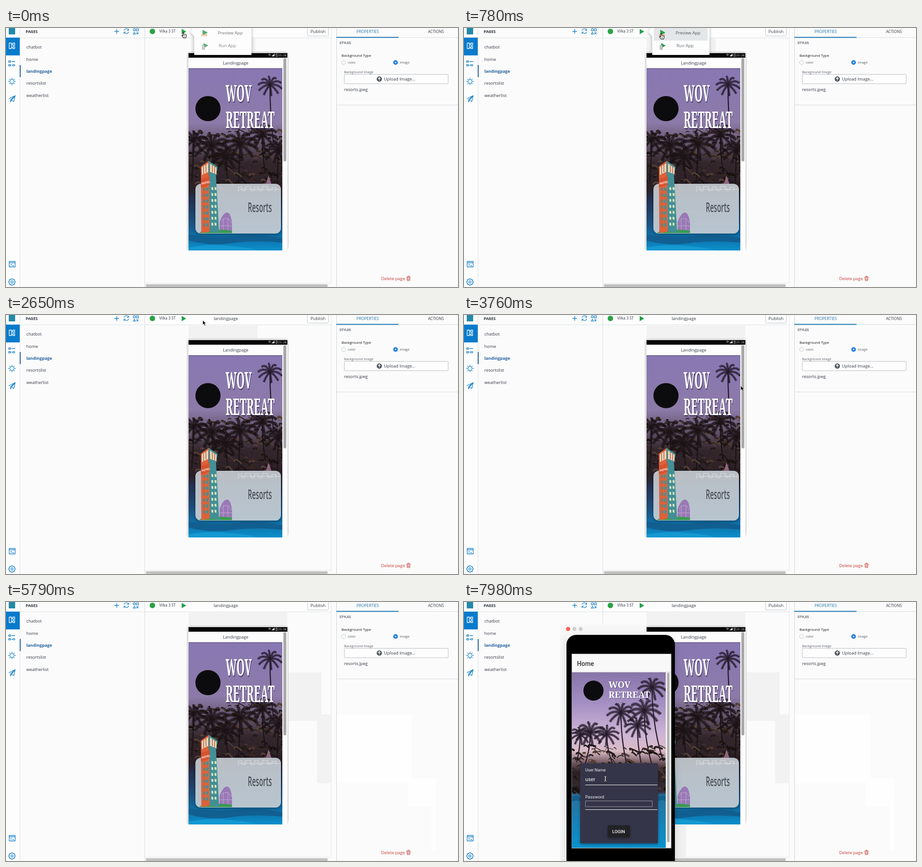
An HTML page for the animation above (8000 ms loop, 988 by 567 pixels).

```html
<!DOCTYPE html>
<html lang="en">
<head>
<meta charset="utf-8">
<title>App builder preview</title>
<style>
  html, body { margin: 0; width: 100%; height: 100%; overflow: hidden; background: #fbfbfb; }
  svg { display: block; width: 988px; height: 567px; font-family: "Open Sans", "Noto Sans", sans-serif; }
  .roboto { font-family: Roboto, "Liberation Sans", sans-serif; }
  .slab { font-family: "Noto Serif", "DejaVu Serif", serif; font-weight: 700; }
  .mono { font-family: "DejaVu Sans Mono", monospace; }
</style>
</head>
<body>
<svg id="stage" viewBox="0 0 988 567" xmlns="http://www.w3.org/2000/svg"></svg>
<script>
const LOOP = 8000;
const BLUE = '#1580c8', INK = '#323844', GREEN = '#25a04c';

const rect = (x, y, w, h, fill, extra = '') =>
  `<rect x="${x}" y="${y}" width="${w}" height="${h}" fill="${fill}" ${extra}/>`;
const circle = (x, y, r, fill, extra = '') =>
  `<circle cx="${x}" cy="${y}" r="${r}" fill="${fill}" ${extra}/>`;
const path = (d, fill, extra = '') => `<path d="${d}" fill="${fill}" ${extra}/>`;
const line = (d, color, width = 1, extra = '') =>
  path(d, 'none', `stroke="${color}" stroke-width="${width}" ${extra}`);
const text = (x, y, s, size, fill = INK, extra = '') =>
  `<text x="${x}" y="${y}" font-size="${size}" fill="${fill}" ${extra}>${s}</text>`;
const group = (content, extra = '') => `<g ${extra}>${content}</g>`;
const at = (x, y, content) => group(content, `transform="translate(${x} ${y})"`);
const layer = (id, content) => group(content, `id="${id}" visibility="hidden"`);
const gradient = (id, stops) =>
  `<linearGradient id="${id}" x2="0" y2="1">${stops.map(([o, c]) =>
    `<stop offset="${o}" stop-color="${c}"/>`).join('')}</linearGradient>`;

function seeded(seed) {
  return () => (seed = (seed * 16807) % 2147483647) / 2147483647;
}

const defs = `<defs>
  ${gradient('dusk', [[0, '#8878b3'], [.3, '#8c7aa8'], [.42, '#64536a'], [.52, '#33262c'],
    [.66, '#2b2027'], [.72, '#22304f'], [.85, '#1b527f'], [.92, '#0f6ea5'], [1, '#0b8fcb']])}
  ${gradient('evening', [[0, '#8774a9'], [.18, '#a590c4'], [.36, '#d0b6d5'], [.45, '#d9bbc5'],
    [.52, '#6b5158'], [.57, '#2c2024'], [.68, '#382c35'], [.7, '#28709c'], [1, '#0893cf']])}
  <filter id="soft" x="-20%" y="-20%" width="140%" height="140%">
    <feDropShadow dx="0" dy="2" stdDeviation="3" flood-opacity=".35"/></filter>
  <filter id="faint" x="-20%" y="-20%" width="140%" height="140%">
    <feDropShadow dx="0" dy="3" stdDeviation="8" flood-opacity=".13"/></filter>
  <clipPath id="pageClip">${rect(399, 88, 205, 399, '#000')}</clipPath>
  <clipPath id="appClip">${rect(236, 154, 205, 384, '#000')}</clipPath>
</defs>`;

// Feathered fronds around a crown, on a gently bent trunk.
function palm([x, y, r, dx, dy], color) {
  let fronds = '';
  for (let i = 0; i < 10; i++) {
    const a = i * Math.PI / 5 + x;
    const c = Math.cos(a), s = Math.sin(a);
    fronds += `M${x} ${y}Q${x + .55 * r * c} ${y + .6 * r * s - .28 * r} ${x + r * c} ${y + .75 * r * s + .15 * r}`;
  }
  return line(fronds, color, r * .19, 'stroke-dasharray="1.4 .8"') + line(fronds, color, 1.3) +
    line(`M${x} ${y}Q${x} ${y + dy / 2} ${x + dx} ${y + dy}`, color, 2.4);
}

function foliage(x, y, w, h, count, seed) {
  const rnd = seeded(seed), tones = ['#17110f', '#241a1c', '#392724', '#1e1b16', '#564035'];
  let out = '';
  for (let i = 0; i < count; i++) {
    const px = x + rnd() * w, py = y + rnd() * h, s = 5 + rnd() * 13;
    out += line(`M${px} ${py}q${s * (rnd() - .5)} ${-s * .6} ${s} ${s * (rnd() - .3)}`,
      tones[i % 5], 1 + rnd() * 3.5);
  }
  return out;
}

function banner(transform) {
  const words = (dx, dy, fill) =>
    text(56 + dx, 18 + dy, 'WOV', 19.2, fill) + text(56 + dx, 40 + dy, 'RETREAT', 19.2, fill);
  return group(words(1, 1.3, 'rgba(35,25,60,.5)') + words(0, 0, '#fff'),
    `class="slab" transform="${transform}"`);
}

const play = (x, y, w, h, fill = GREEN) => path(`M${x} ${y}l${w} ${h / 2}l${-w} ${h / 2}z`, fill);

function sidebar() {
  const icon = (x, y, d, color = BLUE) => at(x, y, line(d, color, 1.3, 'stroke-linejoin="round"'));
  let rays = '', teeth = '';
  for (let i = 0; i < 8; i++) {
    const a = i * Math.PI / 4, c = Math.cos(a), s = Math.sin(a);
    rays += `M${6 * c} ${6 * s}L${8 * c} ${8 * s}`;
    teeth += `${i ? 'L' : 'M'}${7.2 * Math.cos(a - .2)} ${7.2 * Math.sin(a - .2)}L${7.2 * Math.cos(a + .2)} ${7.2 * Math.sin(a + .2)}` +
      `L${5.4 * Math.cos(a + .36)} ${5.4 * Math.sin(a + .36)}`;
  }
  return rect(0, 0, 30, 567, '#fdfdfd') + rect(30, 0, 1, 567, '#dcdfe2') +
    rect(6, 0, 14, 14, '#2389a9') + rect(0, 21, 30, 39, '#087bcc') +
    icon(7, 33, 'M0 0h5v12h-5zM8 0h4v5h-4zM8 8h4v4h-4zM5 2h3M5 10h3', '#fff') +
    icon(6, 71, 'M0 1h4v3h-4zM0 9h4v3h-4zM6 2.5h8M6 10.5h3M12 10.5h2') +
    circle(17, 81.5, 1.8, 'none', `stroke="${BLUE}" stroke-width="1.2"`) +
    circle(13, 117, 4.5, 'none', `stroke="${BLUE}" stroke-width="1.3"`) + icon(13, 117, rays) +
    icon(6, 148, 'M0 7L14 0L11 13L6 10L4 14V9L14 0L6 10') +
    icon(7, 511, 'M0 0h13v12h-13zM0 3h13M3 6l2 1.5l-2 1.5M7 9h3') +
    icon(13, 556, teeth + 'z') + circle(13, 556, 2.4, 'none', `stroke="${BLUE}" stroke-width="1.2"`);
}

function pageList() {
  const names = ['chatbot', 'home', 'landingpage', 'resortslist', 'weatherlist'];
  const rows = names.map((name, i) => {
    const on = i === 2;
    return text(44.5, 45.3 + i * 26.3, name, on ? 9.2 : 9.4, on ? '#235f9f' : INK, on ? 'font-weight="700"' : '');
  }).join('');
  const stroke = `stroke="${BLUE}" stroke-width="1.2"`;
  return text(43, 10.5, 'PAGES', 8.5, INK, 'font-weight="700"') + rows +
    rect(30, 81, 2, 26.5, '#275d95') + rect(303, 0, 1, 567, '#d5d8da') + rect(30, 21, 274, 1, '#e0e2e4') +
    line('M237 7.5h10M242 2.5v10', BLUE, 1.4) +
    line('M258 5.5a5.2 5.2 0 0 1 9.5-1.2M268 1.5v4h-4M268 8.5a5.2 5.2 0 0 1-9.5 1.2M258 13v-4h4', BLUE, 1.2) +
    circle(280.5, 4, 2.4, 'none', stroke) + rect(285, 2, 4.4, 4.4, 'none', stroke) +
    line('M278 13.5l2.5-4l2.5 4zM285 9.5l4.5 4M289.5 9.5l-4.5 4', BLUE, 1.2);
}

function toolbar() {
  return rect(304, 0, 407, 21, '#fdfdfd') + rect(304, 21, 407, 1, '#dcdfe1') +
    circle(320, 7.5, 6, '#2ba143') + text(335, 10, 'Vilka 3 ST', 8.2) +
    play(384, 2, 10, 11.5) + text(454, 11, 'landingpage', 9.3) +
    rect(659, -3, 45.5, 20.5, '#fff', 'rx="2" stroke="#bfc3c7"') + text(665.5, 11, 'Publish', 9.6) +
    rect(710.5, 0, 1, 559, '#e3e5e6') + rect(304, 558.5, 407, 1, '#e1e3e4') +
    rect(305.5, 561, 398, 6, '#c1c1c1', 'rx="3"');
}

function properties() {
  return rect(722, 0, 266, 567, '#fbfbfb') + rect(722, 0, 1, 567, '#cfd2d5') + rect(722, 20.5, 266, 1, '#d6d9dc') +
    rect(722, 19.5, 136, 2, '#1c78b4') + rect(722, 168, 266, 1, '#d6d9dc') +
    text(766, 10.5, 'PROPERTIES', 8.6, '#1f77ad') + text(922.5, 10.5, 'ACTIONS', 8.35) +
    text(729, 35, 'STYLES', 7.4, INK, 'font-weight="600"') + text(733.5, 63, 'Background Type', 8, '#111') +
    circle(738, 75.5, 4.5, '#fff', 'stroke="#b0b4b8" stroke-width=".8"') + text(747, 78.3, 'color', 7.4, '#555b64') +
    circle(851.5, 75.5, 5, '#1877e6') + circle(851.5, 75.5, 1.8, '#fff') + text(861, 78.3, 'image', 7.4, '#555b64') +
    text(739, 99.3, 'Background Image', 7.35, '#5c626b') +
    rect(739.5, 101.5, 227, 20.5, '#fdfdfd', 'rx="1.5" stroke="#b9bdc1"') +
    circle(816, 111.7, 5.7, '#4b535e') + line('M816 115v-6M813.3 111.2l2.7-2.7l2.7 2.7', '#fff', 1.4) +
    text(826, 115, 'Upload Image...', 9.45) + text(739, 138, 'resorts.jpeg', 9.4) +
    text(820, 551.8, 'Delete page', 9.35, '#c53a35') +
    line('M875.5 545.5h8.5M876.5 546l.6 7h5.5l.6-7M878 545v-1.7h3.5v1.7M878.7 547.5v4M881 547.5v4', '#c53a35', 1);
}

// Rectangles left tinted where the pointer has passed.
const ghosts = [
  [0, 404, 23, 141, 30], [510, 399, 23, 151, 30], [3760, 399, 23, 216, 30], [3910, 604, 154, 86, 106],
  [4990, 680, 246, 31, 151], [4990, 723, 246, 165, 151],
  [5170, 878, 385, 63, 62], [5490, 930, 447, 11, 95]
];

function hotel() {
  let windows = '';
  for (let i = 0; i < 7; i++) for (let j = 0; j < 2; j++) {
    const y = 350 + i * 13;
    windows += path(`M${431 + j * 7} ${y}l4-.7v7l-4 .5z`, '#478f91') +
      path(`M${449 + j * 7} ${y - 2}l4 1v6l-4-1z`, '#d9e2bd');
  }
  return path('M467 449V424q8-20 16-20t11 23v22z', '#9a78b6') +
    path('M470 424q13-16 23 3M467 433h27M475 416v33M485 416v33', 'none', 'stroke="#c1abd0"') +
    path('M422 449q15-12 33-6q18-3 39 1v5z', '#399c51') +
    path('M426 303l17-12l2 155l-18 3z', '#df6138') + path('M443 291l20 13l-4 19l7 126l-21-4z', '#438f95') +
    path('M428 305l14-9v19l-14 7zM446 297l14 9v14l-14-5z', '#e6d9bd') +
    line('M432 303v17M437 299v17M451 300v16M456 303v15', '#c15338', 1.5) +
    path('M426 331l19-7v19l-19 6z', '#d8522e') + windows +
    text(428, 343, 'HOTEL', 6, '#fff', 'font-weight="700" transform="rotate(-14 428 343)"');
}

function device() {
  const palms = [[410, 246, 32, -4, 90], [450, 258, 40, 10, 85], [511, 255, 40, -4, 95],
    [560, 235, 35, 12, 110], [481, 284, 32, 8, 70], [595, 268, 32, -3, 80]];
  const scene = rect(399, 88, 205, 399, 'url(#dusk)') +
    foliage(394, 225, 210, 120, 190, 77) + palms.map(p => palm(p, '#1b1316')).join('') +
    palm([577, 125, 27, 9, 140], '#241a2b') + foliage(394, 318, 210, 30, 35, 12) +
    path('M568 341l6-18l6 18z', '#8e6683') +
    path('M399 452q60 8 105 3t100 5v10q-60-6-110 1t-95-6z', '#115f91') +
    path('M399 481q40-9 90-4t60 10h-150z', '#1499d2');
  return path('M395 483V61q0-10 10-10h203q10 0 10 10v412q0 8-3 14h-217q-3-2-3-4z', '#e0e0e0') +
    rect(399, 55, 216, 432, '#fdfdfd') + rect(399, 55, 216, 10, '#050505') +
    text(595, 62, '23:26', 6, '#ddd', 'class="mono"') +
    line('M573 58.5q3-3 6 0M574.5 60.3q1.5-1.5 3 0', '#ddd', 1) + path('M580 62l7-6v6z', '#ddd') +
    rect(590, 57, 3, 5, 'none', 'stroke="#ddd" stroke-width=".8"') +
    text(474, 80, 'Landingpage', 9.3) +
    group(scene + circle(441.5, 176.5, 27.5, '#0c0b0d') + banner('translate(414 113) scale(1.18 2.65)') +
      rect(414, 341, 187, 109, '#c9d0d6', 'rx="12" opacity=".9" filter="url(#soft)"') +
      line('M508 358v-10h8v8h7v-9h12v9h8v-8h9v8h8v-9h12v8h9v-6h9v7M510 353h88', '#eef0f1', .8, 'stroke-dasharray="6 1"') +
      hotel() +
      text(0, 0, 'Resorts', 14.5, '#4b5158', 'font-weight="600" transform="translate(528.5 403) scale(1 1.95)"'),
      'clip-path="url(#pageClip)"') +
    rect(399, 88, 205, 2, 'rgba(0,0,0,.16)') + rect(606.3, 66, 6.4, 226, '#a8a8a8', 'rx="3"');
}

function menu() {
  return path('M411.5-5L403 8.5L411.5 18V59H536.5V-5z', '#fdfdfd', 'filter="url(#soft)"') +
    rect(415, -2, 117.5, 29.5, '#e3e7ea', 'id="highlight"') +
    group(play(429, 4, 11.5, 12) + text(426, 18, 'LIVE', 6.3, '#e7813f', 'font-weight="700"') +
      play(431, 33, 10, 11) + rect(428.5, 38, 5, 9, '#c9c9c9', 'stroke="#8b8b8b" stroke-width=".8"') +
      text(462.5, 14.2, 'Preview App', 9.5, '#4f545c') + text(464.5, 42, 'Run App', 9.5, '#646971'),
      'id="menuItems"');
}

function emulator() {
  const palms = [[276, 286, 33, -13, 75], [312, 290, 28, 15, 70], [343, 243, 31, 12, 110],
    [254, 291, 25, -8, 60], [394, 239, 36, 16, 115], [379, 272, 29, 8, 80], [411, 188, 31, 24, 160]];
  const scene = rect(236, 154, 205, 384, 'url(#evening)') +
    foliage(231, 315, 210, 105, 150, 31) + palms.map(p => palm(p, '#261c2b')).join('') +
    path('M236 426q10-6 18 2v8q-10-4-18 1zM424 424h17v12q-9-5-17 0z', '#145f8e') +
    circle(283, 194, 22, '#0c0b0d') + banner('translate(260 170)');
  return rect(210, 50, 189, 22, '#f7f7f7') + rect(210, 72, 15, 495, '#f5f5f5') +
    rect(461, 488, 24, 70, '#f0f0f0') +
    rect(224, 72, 237, 520, '#000', 'rx="21" filter="url(#faint)"') +
    circle(227.5, 59, 4.6, '#f95f56') + circle(241.3, 59, 4.4, '#cdcdcd') + circle(255, 59, 4.4, '#cdcdcd') +
    rect(235.5, 113.5, 217.5, 425.5, '#f8f8f8', 'stroke="#777"') +
    text(247, 139.5, 'Home', 13.8, '#333', 'font-weight="500"') +
    group(scene, 'clip-path="url(#appClip)"') + rect(236, 153, 217, 1.2, '#c9c9c9') +
    rect(443.7, 155, 5.5, 371, '#b2b2b2', 'rx="2.7"') +
    rect(254, 353, 170, 175.5, '#35344a', 'rx="1.5" filter="url(#soft)"') +
    text(265, 371.3, 'User Name', 9, '#efeff4') + rect(265, 400, 158, 1, '#fff') + rect(265, 454, 158, 1, '#fff') +
    text(265, 392, '', 11.3, '#fff', 'id="userName"') + rect(265, 381.5, 1, 13, '#fff', 'id="caret"') +
    text(265, 445.7, 'Password', 11.1, '#efeff4', 'id="password"') +
    rect(265.5, 435.5, 146, 12.5, 'none', 'id="focusBox" stroke="#d8d8de" stroke-dasharray="1 .6"') +
    rect(314, 489, 49, 26.5, '#222127', 'rx="2" filter="url(#soft)"') +
    text(324, 505.5, 'LOGIN', 9.7, '#fff', 'font-weight="500"') +
    line('M306.5 381.5q2.5 0 2.5 2v7q0 2-2.5 2M311.5 381.5q-2.5 0-2.5 2v7q0 2 2.5 2', '#111', 2.6) +
    line('M306.5 381.5q2.5 0 2.5 2v7q0 2-2.5 2M311.5 381.5q-2.5 0-2.5 2v7q0 2 2.5 2', '#fff', 1);
}

const arrow = path('M0 0v10l2.4-2.1l1.9 4l1.9-.9l-1.9-3.8h3.2z', '#000', 'stroke="#fff" stroke-width=".8"');
const hand = path('M-1 0q1.4-1 2 .4V4q3 0 5.4 1.4q.5 4-1.2 6.2H-.5q-1.5-2.8-3.2-5q0-1.3 1.3-1L-1 7z',
  '#fff', 'stroke="#111" stroke-width="1.1" stroke-linejoin="round"') + line('M1.2 6.5v2.5M3.2 6.5v2.5', '#111', .7);

const stage = document.getElementById('stage');
stage.innerHTML = defs + rect(0, 0, 988, 567, '#fbfbfb') + sidebar() + pageList() + toolbar() + properties() +
  ghosts.map(([, x, y, w, h], i) => layer('ghost' + i, rect(x, y, w, h, x < 711 ? '#f2f2f2' : '#fefefe'))).join('') +
  device() + layer('menu', menu()) + layer('emulator', group(emulator(), 'class="roboto"')) +
  layer('hand', hand) + layer('arrow', arrow);

const el = id => document.getElementById(id);
const show = (id, on) => el(id).setAttribute('visibility', on ? 'inherit' : 'hidden');
const showLayer = (id, on) => el(id).setAttribute('visibility', on ? 'visible' : 'hidden');
const place = (id, x, y) => el(id).setAttribute('transform', `translate(${x} ${y})`);

// Pointer hops: start time, x, y.
const hops = [
  [0, 388, 10], [270, 396, 11], [390, 415, 12], [510, 431, 12.5], [2650, 430, 11.5], [3760, 605, 155],
  [3910, 680, 247], [4990, 880, 384], [5170, 931, 435], [5310, 931, 444], [5490, 930.5, 519], [5640, 930.5, 529]
];
const latest = (list, t) => list.filter(item => item[0] <= t).pop();

function update(t) {
  const [, x, y] = latest(hops, t);
  place('hand', x, y);
  place('arrow', x, y);
  showLayer('hand', t < 2650);
  showLayer('arrow', t >= 2650 && t < 5790);

  showLayer('menu', t < 2650);
  show('highlight', t >= 660 && t < 2650);
  el('highlight').setAttribute('opacity', t < 780 ? .5 : 1);
  el('menuItems').setAttribute('opacity', t < 120 ? .82 : 1);
  place('menuItems', t < 120 ? .6 : 0, 0);
  ghosts.forEach(([start], i) => showLayer('ghost' + i, t >= start));

  showLayer('emulator', t >= 6700);
  const [, typed, caretX] = latest([[0, '', 265], [7540, 'us', 277], [7690, 'user', 287]], t);
  el('userName').textContent = typed;
  el('caret').setAttribute('x', caretX);
  show('caret', t >= 7120 && t < 7980);
  const focused = t >= 7980;
  show('focusBox', focused);
  el('password').setAttribute('y', focused ? 430 : 445.7);
  el('password').setAttribute('font-size', focused ? 9.4 : 11.1);
}

const start = performance.now();
function tick() {
  update((performance.now() - start) % LOOP);
  requestAnimationFrame(tick);
}
tick();
</script>
</body>
</html>
```
